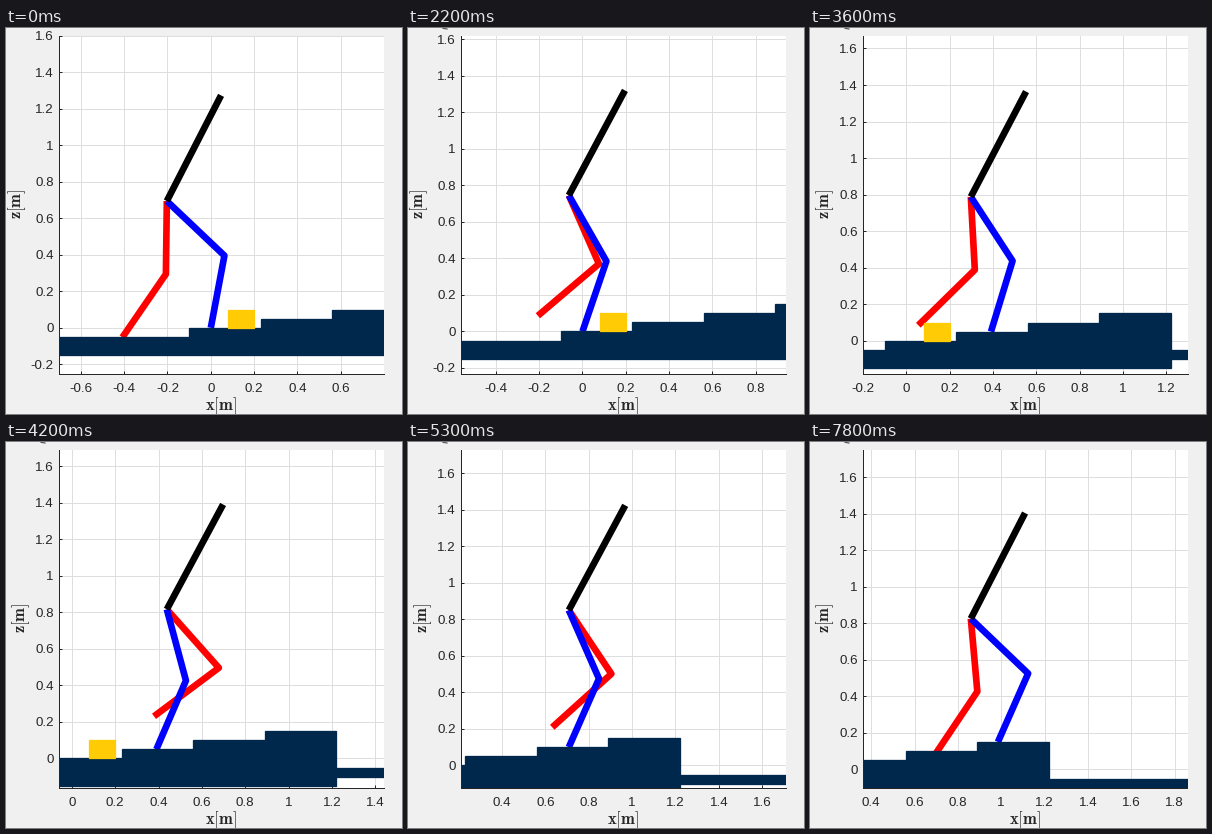
Recreate the animation shown at these times as a matplotlib script. Size 396 by 386 pixels, loop 8 s.

```python
import matplotlib.pyplot as plt
import numpy as np
from matplotlib.animation import FuncAnimation
from matplotlib.patches import Rectangle
from matplotlib.ticker import FuncFormatter, MultipleLocator

W, H, DPI = 396, 386, 100
FRAMES, INTERVAL = 80, 100
PT = 72 / DPI  # points per pixel

INK, NAVY, MAIZE = "#262626", "#00274c", "#ffcb05"
LINK, TORSO = 0.4, 0.63
X0, X_SPAN = -0.203, 1.5
Z0, Z_SPAN = -0.25, 1.85

# Footholds in walking order; each step swings from one to the next but one.
HOLDS = np.array([(-0.393, -0.03), (0, 0), (0.39, 0.05), (0.708, 0.10), (0.985, 0.15)])
SINK = np.array([-0.015, -0.022])  # a rear foot starts its swing inside the ground
STARTS = (16, 34, 47, 59)
LIFTS = (0.12, 0.19, 0.12, 0)

HIP_X = ((16, 28, 36, 47, 59), (X0, 0.077, 0.297, 0.556, 0.86))
HIP_Z = ((16, 22, 28, 34, 36, 41, 47, 53, 59),
         (0.694, 0.745, 0.770, 0.757, 0.788, 0.822, 0.787, 0.850, 0.825))

plt.rcParams["font.family"] = "Liberation Sans"
plt.rcParams["mathtext.fontset"] = "cm"


def knee(hip, foot):
    """Knee of a two-link leg that bends forward."""
    dx, dz = foot - hip
    dist = np.hypot(dx, dz)
    bend = np.sqrt(max(LINK**2 - dist**2 / 4, 0))
    return (hip + foot) / 2 + bend * np.array([-dz, dx]) / dist


def pose(frame):
    """Hip, swing foot, stance foot and torso lean."""
    hip = np.array([np.interp(frame, *HIP_X), np.interp(frame, *HIP_Z)])
    step = max(sum(frame >= t for t in STARTS) - 1, 0)
    s = 0
    if step < 3:
        s = max(frame - STARTS[step], 0) / (STARTS[step + 1] - STARTS[step])
    a, b = HOLDS[step] + SINK, HOLDS[min(step + 2, 4)]
    arc = np.sin(np.pi * s)
    swing = a + (b - a) * np.array([s**1.25, s])
    swing[1] += LIFTS[step] * arc
    lean = np.radians(23.4 + arc)
    return hip, swing, HOLDS[step + 1], lean


def tick_text(value, _):
    return f"{round(value, 1) + 0.0:g}"


fig = plt.figure(figsize=(W / DPI, H / DPI), dpi=DPI, facecolor="#f0f0f0")
left, right, top, bottom = 52.5, 377.5, 7.5, 345.5
ax = fig.add_axes([left / W, 1 - bottom / H, (right - left) / W, (bottom - top) / H])
ax.set_axisbelow(True)
ax.grid(color="#dedede", lw=PT)
for side in ("top", "right"):
    ax.spines[side].set_visible(False)
for side in ("left", "bottom"):
    ax.spines[side].set(color=INK, linewidth=PT)
for axis in (ax.xaxis, ax.yaxis):
    axis.set_major_locator(MultipleLocator(0.2))
    axis.set_major_formatter(FuncFormatter(tick_text))
ax.tick_params(direction="in", length=3 * PT, width=PT, color=INK,
               labelcolor=INK, labelsize=13.33 * PT)
ax.tick_params(axis="x", pad=9.5 * PT)
ax.tick_params(axis="y", pad=4.8 * PT)


def axis_label(name, x, y, **kw):
    return fig.text(x / W, 1 - y / H, rf"$\mathbf{{{name}}}[\mathbf{{m}}]$", color=INK,
                    fontsize=16.6 * PT, ha="center", va="center", **kw)


axis_label("x", 214.5, 378)
z_label = axis_label("z", 11, 175.5, rotation=90)
speck = plt.Line2D([35 / W, 39 / W], [1 - 0.3 / H, 1 - 1 / H], color="#555555", lw=1.2 * PT)
fig.add_artist(speck)


def block(x0, x1, z0, z1, color):
    ax.add_patch(Rectangle((x0, z0), x1 - x0, z1 - z0, fc=color, ec=color,
                           lw=1.3 * PT, zorder=2))


block(-2, -0.1, -0.15, -0.05, NAVY)
for i in range(4):
    x = -0.1 + 0.33 * i
    block(x, x + 0.33, -0.15, 0.05 * i, NAVY)
block(1.22, 4, -0.10, -0.05, NAVY)
block(0.08, 0.2, 0, 0.1, MAIZE)


def limb(color, z):
    return ax.plot([], [], color=color, lw=6.67 * PT, zorder=z,
                   solid_capstyle="butt", solid_joinstyle="round")[0]


# Limbs lie behind the ground, which cuts the feet off flush.
swing_leg, stance_leg, torso = limb("red", 1.1), limb("blue", 1.2), limb("black", 1.3)


def draw(frame):
    hip, swing, stance, lean = pose(frame)
    for leg, foot in ((swing_leg, swing), (stance_leg, stance)):
        leg.set_data(*np.array([hip, knee(hip, foot), foot]).T)
    head = hip + TORSO * np.array([np.sin(lean), np.cos(lean)])
    torso.set_data(*np.array([hip, head]).T)

    x_min = hip[0] - 0.5
    z_min = Z0 + 0.142 * (hip[0] - X0)
    ax.set_xlim(x_min, x_min + X_SPAN)
    ax.set_ylim(z_min, z_min + Z_SPAN)
    # The label moves in once no negative tick is left.
    z_label.set_x((11 if z_min <= -0.2 else 15) / W)
    speck.set_visible(frame >= 8)
    return swing_leg, stance_leg, torso


anim = FuncAnimation(fig, draw, frames=FRAMES, interval=INTERVAL, repeat=True, repeat_delay=0)
plt.show()
```
